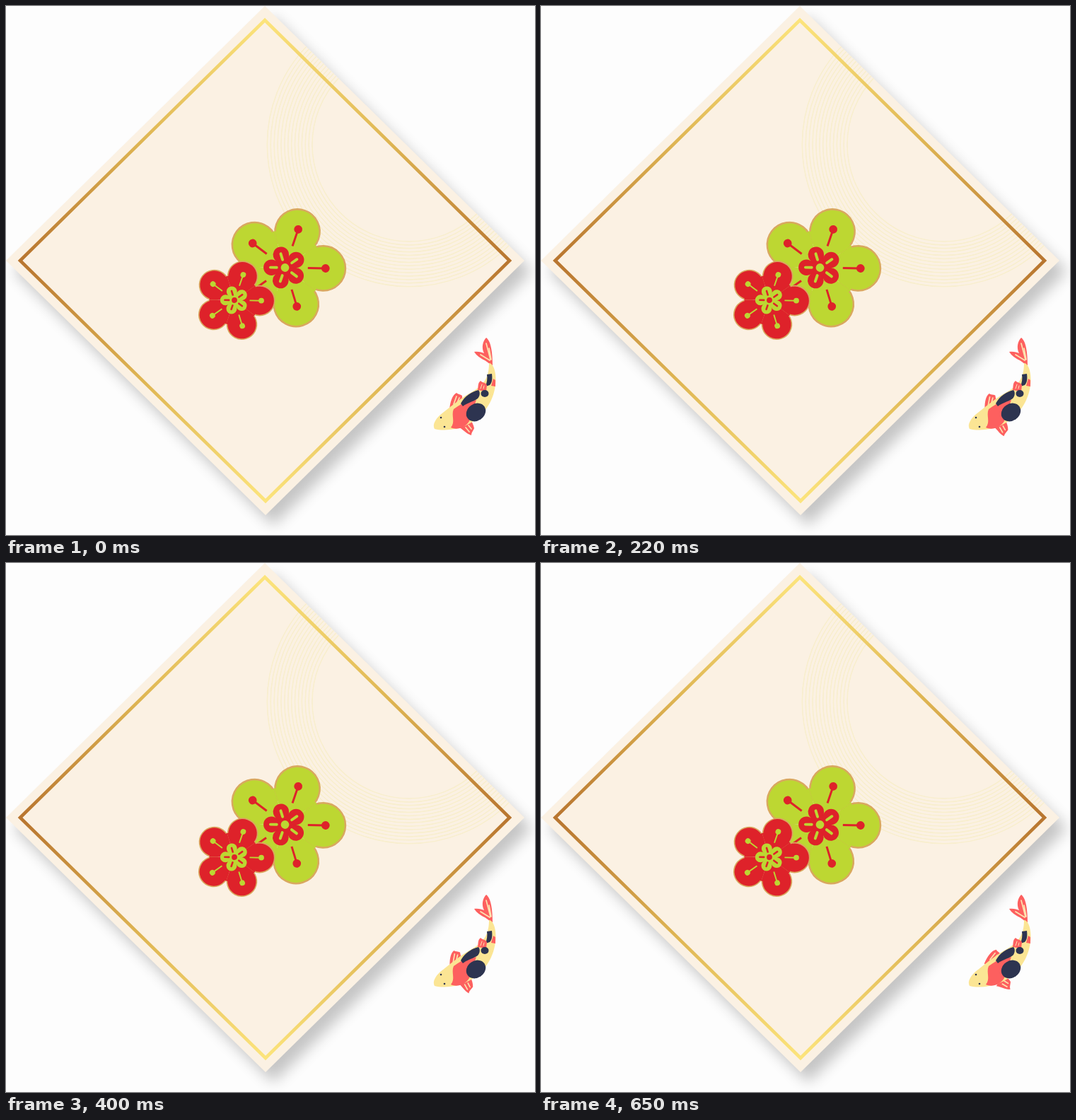
Recreate the animation shown at these times as an HTML page. Size 748 by 748 pixels, loop 750 ms.

```html
<!DOCTYPE html>
<html lang="en">
<head>
<meta charset="utf-8">
<title>Koi and blossoms</title>
<style>
  html, body { margin: 0; width: 100%; height: 100%; overflow: hidden; background: #fdfdfd; }
  svg { display: block; width: 100vw; height: 100vh; }
  .red { fill: #fd605f; }
  .dark { fill: #2d3450; }
  .cream { fill: #fbe594; }
  .vein { fill: none; stroke: #fde3b0; stroke-width: 1.7; stroke-linecap: round; }
</style>
</head>
<body>
<svg viewBox="0 0 748 748">
  <defs>
    <linearGradient id="gold" gradientUnits="userSpaceOnUse" x1="0" y1="20" x2="0" y2="700">
      <stop offset="0" stop-color="#fce47c"/>
      <stop offset=".25" stop-color="#dfb653"/>
      <stop offset=".5" stop-color="#b8752f"/>
      <stop offset=".75" stop-color="#dfb653"/>
      <stop offset="1" stop-color="#fce47c"/>
    </linearGradient>
    <filter id="blur" filterUnits="userSpaceOnUse" x="-40" y="-40" width="840" height="840">
      <feGaussianBlur stdDeviation="10"/>
    </filter>
    <path id="card" d="M366 0L733 360L367 720L0 360Z"/>
    <clipPath id="inside"><use href="#card"/></clipPath>
  </defs>

  <use href="#card" transform="translate(11 15)" fill="#000" opacity=".22" filter="url(#blur)"/>
  <use href="#card" fill="#fbf1e3"/>
  <g id="rings" clip-path="url(#inside)" fill="none" stroke="#f8eecd" stroke-width="1.5"></g>
  <path d="M366 20L712 360L367 700L20 360Z" fill="none" stroke="url(#gold)" stroke-width="4.6"/>
  <g id="flowers"></g>

  <g id="koi">
    <g id="upperFin">
      <path class="red" d="M627 571C628 560 631 550 637 547C639 549 642 549 645 551C645 557 646 562 643 568L636 575Z"/>
      <path class="vein" d="M633 563L637 552M637 563L641 554"/>
    </g>
    <g id="lowerFin">
      <path class="red" d="M641 596C648 600 651 605 658 607C658 603 661 600 662 597C661 592 659 588 655 583Z"/>
      <path class="vein" d="M650 596L655 602M654 593L658 598"/>
    </g>
    <path class="red" d="M685 508C680 500 669 500 662 489C668 488 673 490 676 491C672 483 674 474 679 469C686 474 688 491 688 508Z"/>
    <path class="vein" d="M684 501L671 493M685 500L679 477M686 500L683 484"/>
    <path class="cream" d="M683 505C690 505 694 521 692 536C689 560 675 579 658 589C644 598 621 602 606 598C603 593 606 586 613 579C626 569 640 556 660 545C675 536 683 526 683 505Z"/>
    <path class="red" d="M633 570C640 565 646 561 652 560L665 557L655 587C649 597 637 600 629 596C636 588 629 579 633 570Z"/>
    <path class="red" d="M689 527L692 529L692 538L686 537Z"/>
    <path class="dark" d="M643 562C648 552 659 545 668 543C671 546 670 552 667 555C660 560 652 561 646 566Z"/>
    <ellipse class="dark" rx="14.5" ry="12" transform="translate(664.5 574.5) rotate(-35)"/>
    <path class="dark" d="M680 521L687 520C688 528 687 533 684 536L678 538C680 532 681 527 680 521Z"/>
    <path class="red" d="M667 543C668 537 667 533 671 530C674 533 678 532 680 536L679 545Z"/>
    <path class="vein" d="M671 541L673 535M675 541L676 537" style="stroke-width:1"/>
    <ellipse class="dark" cx="677" cy="548" rx="5.5" ry="5"/>
    <circle class="dark" cx="615" cy="582" r="1.3"/>
    <circle class="dark" cx="620" cy="595" r="1.3"/>
  </g>
</svg>
<script>
  const byId = id => document.getElementById(id);
  const RED = '#de222a', LIME = '#bdd732';

  for (let i = 0; i < 14; i++)
    byId('rings').innerHTML += `<circle cx="570" cy="196" r="${137 + i * 4.9}"/>`;

  // Five-petalled blossom; one arm points right and is repeated every 72 degrees.
  function blossom(x, y, scale, main, accent) {
    const arms = (part, turn = 0) => [0, 1, 2, 3, 4].map(i =>
      `<g transform="rotate(${i * 72 + turn})">${part}</g>`).join('');
    return `<g transform="translate(${x} ${y}) rotate(1) scale(${scale})">
      ${arms('<circle cx="55" r="31.5" fill="none" stroke="#d9a85f" stroke-width="4"/>')}
      ${arms(`<path d="M0 0L44.5 -32.3L55 0L44.5 32.3Z" fill="${main}"/><circle cx="55" r="31" fill="${main}"/>`)}
      ${arms(`<path d="M33 0H58" stroke="${accent}" stroke-width="3"/><circle cx="58.5" r="6" fill="${accent}"/>`)}
      ${arms(`<path d="M0 -7L16 -10V10L0 7Z" fill="${accent}"/><circle cx="19.5" r="11.5" fill="${accent}"/>
        <path d="M12 0H21" stroke="${main}" stroke-width="4" stroke-linecap="round"/>`, 36)}
      <circle r="6" fill="${main}"/></g>`;
  }
  byId('flowers').innerHTML =
    blossom(394.5, 370, 0.98, LIME, RED) + blossom(323, 416, 0.65, RED, LIME);

  // Fin spread in degrees, held until each end time in ms.
  const strokes = [[100, 0], [300, 10], [400, 27], [550, 11], [650, -4], [750, -20]];

  function draw() {
    const t = (performance.now() - start) % 750;
    const spread = strokes.find(([end]) => t < end)[1];
    byId('upperFin').setAttribute('transform', `rotate(${-spread * 0.9} 641 568)`);
    byId('lowerFin').setAttribute('transform', `rotate(${spread} 649 589)`);
    requestAnimationFrame(draw);
  }
  const start = performance.now();
  draw();
</script>
</body>
</html>
```
